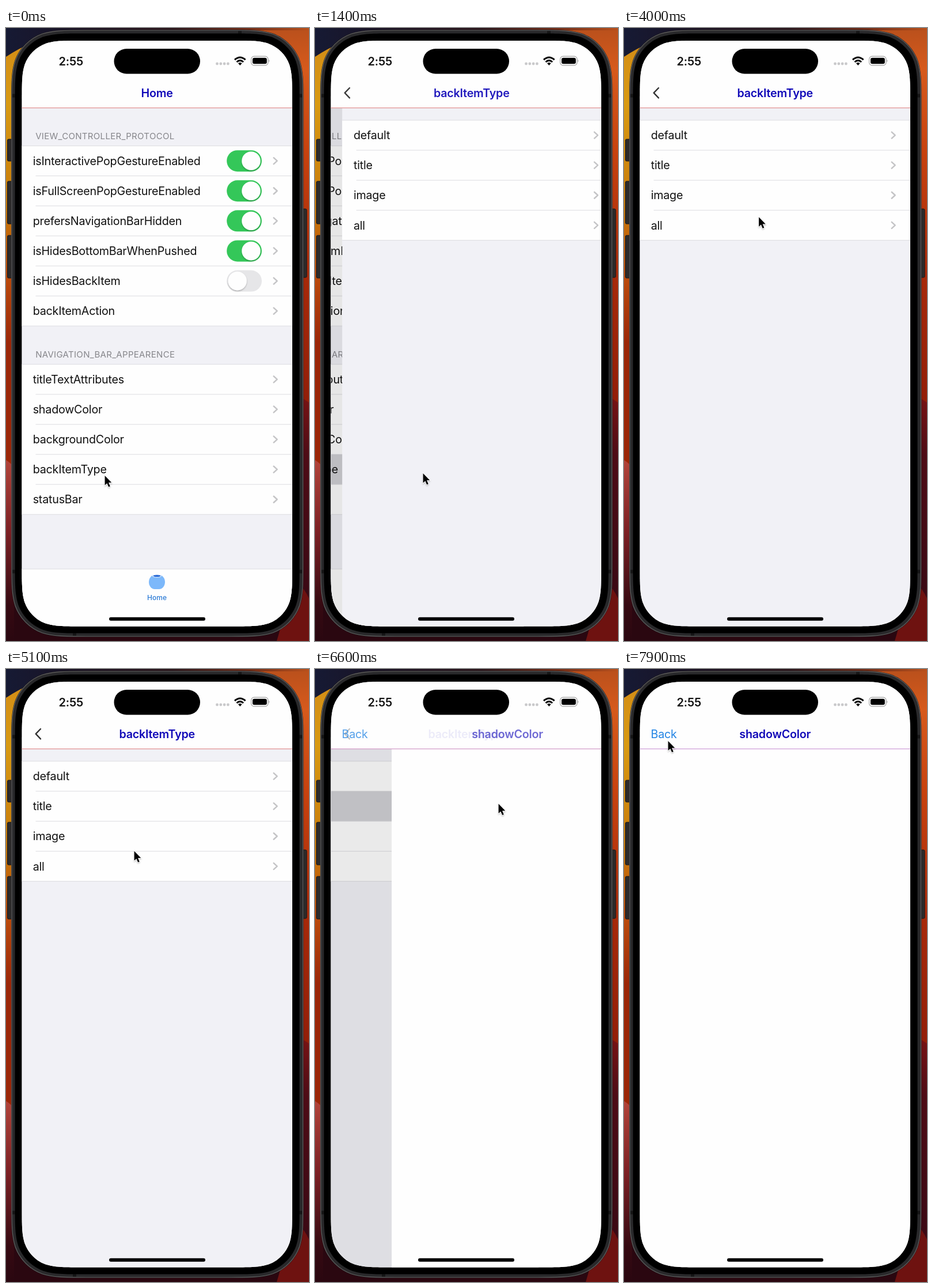
Recreate the animation shown at these times as an HTML page. Size 526 by 1064 pixels, loop 8000 ms.

```html
<!DOCTYPE html>
<html lang="en">
<head>
<meta charset="utf-8">
<title>Navigation bar demo</title>
<style>
html, body { margin: 0; width: 100%; height: 100%; overflow: hidden; background: #1b0d16; }
svg { display: block; width: 100vw; height: 100vh; }
text { font-family: Inter, Roboto, "Liberation Sans", sans-serif; font-size: 19.7px; letter-spacing: -.011em; font-optical-sizing: none; fill: #111; }
.head { font-size: 15px; letter-spacing: .021em; fill: #86868b; }
.title { font-weight: 600; fill: #1008b8; text-anchor: middle; }
.time { font-size: 20px; font-weight: 600; }
.tab { font-size: 12px; font-weight: 500; letter-spacing: 0; fill: #2b7bd6; text-anchor: middle; }
.back { fill: #2284e4; }
.rule { stroke: #dcdce0; stroke-width: 1; }
.arrow { fill: none; stroke: #3c3c43; stroke-opacity: .3; stroke-width: 2.4; stroke-linecap: round; stroke-linejoin: round; }
</style>
</head>
<body>
<svg viewBox="0 0 526 1064" preserveAspectRatio="none">
  <defs>
    <linearGradient id="left" x1="0" y1="0" x2="0" y2="1">
      <stop offset="0" stop-color="#d28a18"/>
      <stop offset=".17" stop-color="#d99a12"/>
      <stop offset=".4" stop-color="#c87a0a"/>
      <stop offset=".55" stop-color="#bd4c0c"/>
      <stop offset=".7" stop-color="#9c2708"/>
    </linearGradient>
    <linearGradient id="leftLow" x1="0" y1="0" x2="0" y2="1">
      <stop offset="0" stop-color="#b2443a"/>
      <stop offset=".4" stop-color="#7c2024"/>
      <stop offset=".8" stop-color="#360a12"/>
      <stop offset="1" stop-color="#2a0710"/>
    </linearGradient>
    <linearGradient id="right" x1="0" y1="0" x2="0" y2="1">
      <stop offset="0" stop-color="#b9501c"/>
      <stop offset=".1" stop-color="#d65a1c"/>
      <stop offset=".3" stop-color="#c8430f"/>
      <stop offset=".6" stop-color="#a82a0a"/>
      <stop offset="1" stop-color="#8e1c08"/>
    </linearGradient>
    <linearGradient id="rightLow" x1="0" y1="0" x2="0" y2="1">
      <stop offset="0" stop-color="#7c1414"/>
      <stop offset=".3" stop-color="#4e0c16"/>
      <stop offset="1" stop-color="#3a0914"/>
    </linearGradient>
    <linearGradient id="top" x1="0" y1="0" x2="1" y2="0">
      <stop offset="0" stop-color="#161a34"/>
      <stop offset=".25" stop-color="#1b1222"/>
      <stop offset=".55" stop-color="#2a141a"/>
      <stop offset=".78" stop-color="#6a2a18"/>
      <stop offset="1" stop-color="#b9501c"/>
    </linearGradient>
    <clipPath id="screen"><path id="glass"/></clipPath>
    <filter id="soft" x="-50%" y="-50%" width="200%" height="200%">
      <feDropShadow dx="0" dy="1.5" stdDeviation="1.3" flood-opacity=".28"/>
    </filter>
  </defs>

  <!-- wallpaper -->
  <rect width="526" height="1064" fill="#2a0710"/>
  <rect x="263" width="263" height="700" fill="url(#right)"/>
  <path d="M480 630Q510 638 526 650V1000H480Z" fill="url(#rightLow)"/>
  <path d="M500 960Q515 966 526 990V1064H470Z" fill="#6e1210"/>
  <rect width="263" height="780" fill="url(#left)"/>
  <path d="M0 750Q8 754 14 764V1064H0Z" fill="url(#leftLow)"/>
  <path d="M0 0H526V4H106Q42 22 0 50Z" fill="url(#top)"/>

  <!-- phone body -->
  <g fill="#2d2b2b" stroke="#181616">
    <rect x="2.5" y="193" width="9" height="38" rx="2"/>
    <rect x="2.5" y="266" width="9" height="74" rx="2"/>
    <rect x="2.5" y="360" width="9" height="74" rx="2"/>
    <rect x="513" y="314" width="9" height="119" rx="2"/>
  </g>
  <path id="shell" fill="#161617"/>
  <path id="frame" fill="#29292b" stroke="#626161" stroke-width="1.2"/>
  <path d="M11 117.500h5M11 943.500h5M509 117.500h5M509 943.500h5M406 5v5M119 1050v5" stroke="#161617" stroke-width="6"/>
  <path id="bezel"/>

  <g clip-path="url(#screen)">
    <rect x="27" y="22" width="471" height="1017" fill="#fefefe"/>
    <g id="pages"></g>
    <rect x="27" y="22" width="471" height="117" fill="#fefefe"/>
    <g id="bars"></g>
    <path id="shadow" d="M27 138.700H498" stroke-width="1.200"/>
  </g>

  <!-- status bar -->
  <text class="time" x="91.500" y="64.500">2:55</text>
  <rect x="187.500" y="36" width="149.500" height="43.500" rx="21.700"/>
  <g fill="#c9c9cb">
    <circle cx="366.500" cy="62" r="2.400"/><circle cx="372.800" cy="62" r="2.400"/>
    <circle cx="379.100" cy="62" r="2.400"/><circle cx="385.400" cy="62" r="2.400"/>
  </g>
  <g fill="none" stroke="#000" stroke-width="3">
    <path d="M397 55.200Q406.300 46.800 415.600 55.200"/>
    <path d="M400.500 59Q406.300 53.800 412.100 59"/>
  </g>
  <path d="M403 61.300Q406.300 58.800 409.600 61.300L406.300 65Z"/>
  <rect x="425.700" y="49.200" width="29.300" height="15.600" rx="5" fill="none" stroke="#a2a2a2" stroke-width="1.200"/>
  <rect x="428" y="51.700" width="24.800" height="10.600" rx="3"/>
  <path d="M456.300 54.500q2.400 2.500 0 5Z" fill="#a2a2a2"/>
  <rect x="179" y="1022.800" width="167" height="6" rx="3"/>

  <g id="cursor">
    <path d="M.6 1V17.600L4.400 14.200L7.100 20.600L9.800 19.400L7.100 13.100H12.200Z" fill="#000" stroke="#fff" stroke-width="1.400" paint-order="stroke" filter="url(#soft)"/>
  </g>
</svg>

<script>
const LOOP = 8000, STEP = 100, LEFT = 28, WIDTH = 469, ROW = 52.1;
const $ = id => document.getElementById(id);

// rounded rectangle whose corners ease into the straight edges
function smoothRect(x, y, w, h, r) {
  const corner = [
    [1.529, 0], [1.088, 0], [.868, 0], [.631, .075],
    [.373, .169], [.169, .373], [.075, .631],
    [0, .868], [0, 1.088], [0, 1.529]
  ];
  const side = (fx, fy) => {
    const pts = corner.map(([a, b]) => [fx ? x + w - a * r : x + a * r, fy ? y + h - b * r : y + b * r]);
    if (fx === fy) pts.reverse();
    return `${pts[0]}C${pts.slice(1).join(' ')}`;
  };
  return `M${side(0, 0)}L${side(1, 0)}L${side(1, 1)}L${side(0, 1)}Z`;
}

$('shell').setAttribute('d', smoothRect(9, 3, 507.5, 1054, 84.5));
$('frame').setAttribute('d', smoothRect(10, 4, 505.5, 1052, 83.5));
$('bezel').setAttribute('d', smoothRect(15.5, 9.5, 494, 1041, 78));
$('glass').setAttribute('d', smoothRect(27.6, 22, 469.2, 1016.5, 65.6));

const rect = (x, y, w, h, fill, more = '') =>
  `<rect x="${x}" y="${y}" width="${w}" height="${h}" fill="${fill}" ${more}/>`;
const rule = (x, y) => `<path class="rule" d="M${x} ${y}H497"/>`;
const text = (cls, x, y, s) => `<text class="${cls}" x="${x}" y="${y}">${s}</text>`;

function toggle(on, y) {
  return rect(383.2, y - 18.5, 60.8, 37, on ? '#34c759' : '#e6e6e8', 'rx="18.5"') +
    `<circle cx="${on ? 425.500 : 401.700}" cy="${y}" r="16.200" fill="#fefefe" filter="url(#soft)"/>`;
}

// rows: [label, switch state, highlight id]
function list(top, rows) {
  const height = rows.length * ROW;
  let out = rect(LEFT - 1, top, WIDTH + 1, height, '#fefefe') + rule(LEFT - 1, top);
  rows.forEach(([label, on, mark], i) => {
    const y = top + i * ROW, mid = y + ROW / 2;
    if (i) out += rule(51.5, y);
    if (mark) out += rect(LEFT - 1, y, WIDTH + 1, ROW, '#d0d0d5', `id="${mark}"`);
    out += text('', 46.7, mid + 7.2, label);
    if (on !== undefined) out += toggle(on, mid);
    out += `<path class="arrow" d="M464.700 ${mid - 5.500}l6 5.500l-6 5.500"/>`;
  });
  return out + rule(LEFT - 1, top + height);
}

const tabBar = rect(LEFT - 1, 939, WIDTH + 1, 100, '#fefefe') + rule(LEFT - 1, 939) +
  '<path d="M255 949.500H269Q276 954 276 961.500C276 969.500 270.500 974 266 974H258C253.500 974 248 969.500 248 961.500Q248 954 255 949.500Z" fill="#7cb8fa"/>' +
  '<ellipse cx="262" cy="951" rx="7.800" ry="2.700" fill="#fefefe"/>' +
  '<ellipse cx="262" cy="951" rx="6.500" ry="1.800" fill="#2366d6"/>' +
  text('tab', 262, 993, 'Home');

const gray = rect(LEFT - 1, 139, WIDTH + 1, 900, '#f1f1f6');
const chevron = '<path d="M60 104l-8.300 8.700l8.300 8.700" fill="none" stroke="#333" stroke-width="2.400" stroke-linecap="round" stroke-linejoin="round"/>';

const views = [
  {
    title: 'Home', left: '', line: [226, 146, 146],
    body: gray + text('head', 51.2, 192.5, 'VIEW_CONTROLLER_PROTOCOL') +
      list(204.6, [
        ['isInteractivePopGestureEnabled', true],
        ['isFullScreenPopGestureEnabled', true],
        ['prefersNavigationBarHidden', true],
        ['isHidesBottomBarWhenPushed', true],
        ['isHidesBackItem', false],
        ['backItemAction']
      ]) +
      text('head', 51.2, 572, 'NAVIGATION_BAR_APPEARENCE') +
      list(583.8, [
        ['titleTextAttributes'], ['shadowColor'], ['backgroundColor'],
        ['backItemType', undefined, 'typeMark'], ['statusBar']
      ]) + tabBar
  },
  {
    title: 'backItemType', left: chevron, line: [226, 146, 146],
    body: gray + list(160, [['default'], ['title', undefined, 'titleMark'], ['image'], ['all']])
  },
  {
    title: 'shadowColor', left: text('back', 46.5, 120, 'Back'), line: [206, 160, 216],
    body: rect(LEFT - 1, 139, WIDTH + 1, 900, '#fefefe')
  }
];

$('pages').innerHTML = views.map((v, i) =>
  `<g id="page${i}">${v.body}${rect(LEFT - 1, 139, WIDTH + 1, 900, '#000', `id="dim${i}"`)}</g>`).join('');
$('bars').innerHTML = views.map((v, i) =>
  `<g id="item${i}">${v.left}</g><g id="name${i}">${text('title', 262.2, 120, v.title)}</g>`).join('');

// push start times for the second and third views
const pushes = [1186, 6477];

function spring(ms) {
  if (ms <= 0) return 0;
  if (ms > 600) return 1;
  const k = ms * 0.023;
  return 1 - (1 + k) * Math.exp(-k);
}

// cursor stops: time, x, y
const stops = [
  [0, 171, 776], [1000, 187, 772], [1700, 187, 772], [2700, 241, 335],
  [3700, 241, 335], [4400, 222, 315], [5500, 222, 315], [6400, 318, 233],
  [7100, 318, 233], [7800, 76, 124], [LOOP, 76, 124]
];

function cursorAt(t) {
  const i = stops.findIndex((s, n) => t < stops[n + 1][0]);
  const [t0, x0, y0] = stops[i], [t1, x1, y1] = stops[i + 1];
  const u = (t - t0) / (t1 - t0), e = u * u * (3 - 2 * u);
  return [x0 + (x1 - x0) * e, y0 + (y1 - y0) * e];
}

const clamp = v => Math.max(0, Math.min(1, v));
const move = (id, x, y = 0) => $(id).setAttribute('transform', `translate(${x} ${y})`);
const fade = (id, a) => $(id).setAttribute('opacity', clamp(a));

function draw(t) {
  const p = pushes.map(start => spring(t - start));
  views.forEach((v, i) => {
    const shown = i ? p[i - 1] : 1;
    const gone = i < p.length ? p[i] : 0;
    const rest = 1 - shown, stay = 1 - gone;
    move('page' + i, rest * WIDTH - gone * WIDTH * 0.3);
    $('page' + i).style.display = shown > 0 && gone < 1 ? '' : 'none';
    fade('dim' + i, gone * 0.1);
    move('name' + i, 200 * rest + 520 * rest * rest);
    fade('name' + i, Math.min(1 - 1.75 * rest, 1.35 * stay - 0.23));
    fade('item' + i, Math.min(shown, stay * 1.3));
  });
  fade('typeMark', t >= 1200 ? 1 : 0);
  fade('titleMark', t >= 6500 ? 1 : 0);
  const [a, b] = [views[1].line, views[2].line];
  $('shadow').setAttribute('stroke', `rgb(${a.map((c, i) => c + (b[i] - c) * p[1])})`);
  move('cursor', ...cursorAt(t));
}

const begin = performance.now();
function tick() {
  const t = (performance.now() - begin) % LOOP;
  draw(Math.floor(t / STEP) * STEP);
  requestAnimationFrame(tick);
}
tick();
</script>
</body>
</html>
```
